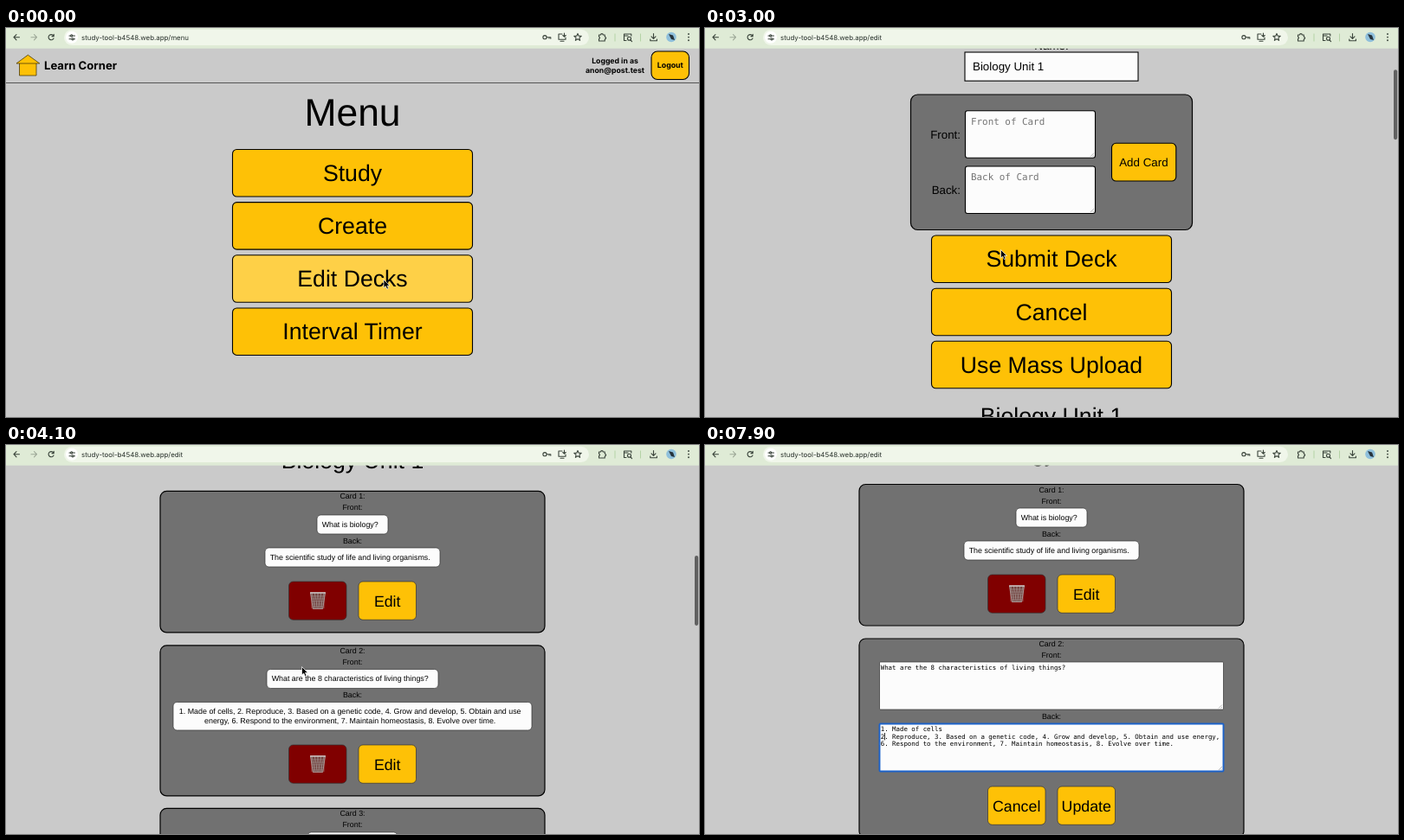
These frames come from a looping animation (800 by 450 pixels, 8 s). An HTML page:

```html
<!DOCTYPE html>
<html lang="en">
<head>
<meta charset="utf-8">
<title>Flashcard editor</title>
<style>
html, body { margin: 0; width: 100%; height: 100%; overflow: hidden; background: #cacaca; }
svg { display: block; width: 100vw; height: 100vh; }
text { font-family: "Liberation Sans", Arial, sans-serif; text-rendering: geometricPrecision; white-space: pre; }
.ui { font-family: Inter, sans-serif; }
.bold { font-weight: 700; }
.mono { font-family: "DejaVu Sans Mono", monospace; }
.hint { fill: #757575; }
.btn { fill: #fec106; stroke: #000; stroke-width: 1.1; }
.hover { fill: #fed047; }
.danger { fill: #800000; }
.panel { fill: #717171; stroke: #000; stroke-width: 1.2; }
.field { fill: #fcfcfc; stroke: #000; stroke-width: 1.1; }
.thin { stroke: #333; stroke-width: .7; }
.focus { stroke: #1c62c9; stroke-width: 1.9; }
.icon { fill: none; stroke: #39433a; stroke-width: 1.1; stroke-linecap: round; stroke-linejoin: round; }
</style>
</head>
<body>
<svg id="stage" viewBox="0 0 800 450"></svg>
<script>
const LOOP = 8000, STEP = 100;
const TIMES = { select: 200, edit: 1700, cardEdit: 5200, backFocus: 6600, typing: 6900 };
const CHAR = 4.455, TEXT_X = 202.7, LINE = 8.7, COLUMNS = 88;

const rect = (x, y, w, h, r, cls, extra = '') =>
  `<rect x="${x}" y="${y}" width="${w}" height="${h}" rx="${r}" class="${cls}" ${extra}/>`;
const text = (str, x, y, size, anchor = 'middle', cls = '', extra = '') =>
  `<text x="${x}" y="${y}" font-size="${size}" text-anchor="${anchor}" class="${cls}" ${extra}>${str}</text>`;
const path = (d, cls = 'icon', extra = '') => `<path d="${d}" class="${cls}" ${extra}/>`;
const group = (id, content, y = 0) => `<g id="${id}" transform="translate(0 ${y})">${content}</g>`;

const bigButton = (label, y, id = '') =>
  rect(261.5, y, 277, 54.5, 5, 'btn', id && `id="${id}"`) + text(label, 400, y + 36.3, 26.67);
const smallButton = (label, x, y, id = '') =>
  rect(x, y, 66.5, 44.3, 5, 'btn thin', id && `id="${id}"`) + text(label, x + 33.2, y + 28.6, 17.78);
const title = label => text(label, 400, 113.3, 44.44);
const grip = (x, y) => path(`M${x - 5} ${y - 1}l4-4M${x - 2.5} ${y - 1}l1.5-1.5`, '', 'stroke="#888" stroke-width=".6"');

function header(x) {
  return path(`M${x + 3.5} 41V55h19.5V41M${x} 41l13.3-9.8L${x + 26.8} 41Z`, '', 'fill="#fec106" stroke="#4b3a08" stroke-width=".8"')
    + text('Learn Corner', x + 32, 48.4, 13.1, 'start', 'ui bold')
    + text('Logged in as', 703, 41.4, 8.7, 'middle', 'ui bold')
    + text('anon@post.test', 703, 51.8, 8.7, 'middle', 'ui bold')
    + rect(745, 27, 43.5, 32.5, 7, 'btn') + text('Logout', 766.8, 46.4, 8.8, 'middle', 'ui bold')
    + path('M0 63.5H800', '', 'stroke="#555" stroke-width="1"');
}

function trash(x, y) {
  let wires = '';
  for (let i = 0; i < 5; i++) {
    wires += `M${x - 7 + i * 3.5} ${y - 9}L${x - 3 + i * 2.5} ${y + 9}M${x + 7 - i * 3.5} ${y - 9}L${x + 3 - i * 2.5} ${y + 9}`;
    wires += `M${x - 7.6 + i * .4} ${y - 5 + i * 3}h${15.2 - i * .8}`;
  }
  return path(`M${x - 8.5} ${y - 9}h17l-2.8 18.5h-11.4Z`, '', 'fill="#71403d" stroke="#b9b2b0" stroke-width=".8"')
    + path(wires, '', 'fill="none" stroke="#aaa19f" stroke-width=".45"')
    + path(`M${x - 9} ${y - 9}h18`, '', 'stroke="#d2cdcb" stroke-width="1.3"');
}

const answerBox = (y, width, lines) =>
  rect(400 - width / 2, y, width, 22 + (lines.length - 1) * 10.5, 4.5, 'field thin')
  + lines.map((line, i) => text(line, 397.2, y + 13.9 + i * 10.4, 8.89)).join('');

const cardLabels = (n, backY) =>
  text(`Card ${n}:`, 400, 9, 8.89) + text('Front:', 400, 22, 8.89) + text('Back:', 400, backY, 8.89);

function card(n, frontWidth, front, backWidth, back, id = '') {
  const y = 104.5 + (back.length - 1) * 10.5;
  return rect(178, 0, 444, y + 59, 7.5, 'panel') + cardLabels(n, 60.5)
    + answerBox(27.5, frontWidth, [front]) + answerBox(65.5, backWidth, back)
    + rect(326.5, y, 66.5, 44.3, 5, 'btn thin danger') + trash(360, y + 22)
    + smallButton('Edit', 407, y, id);
}

const editArea = (id, y) => rect(201.5, y, 397, 55, 1, 'field thin', `id="${id}"`) + grip(598, y + 54.5);
const question = 'What are the 8 characteristics of living things?';

const cardForm = rect(178, 0, 444, 230, 7.5, 'panel') + cardLabels(2, 93.3)
  + editArea('frontArea', 27) + editArea('backArea', 98.5)
  + text(question, TEXT_X, 35.5, 7.4, 'start', 'mono')
  + [0, 1, 2].map(i => text('', TEXT_X, 107 + i * LINE, 7.4, 'start', 'mono', `id="line${i}"`)).join('')
  + '<rect id="caret" width=".8" height="8.4"/>'
  + smallButton('Cancel', 326.5, 171) + smallButton('Update', 407, 171);

const menuPage = header(12) + title('Menu')
  + ['Study', 'Create', 'Edit Decks', 'Interval Timer'].map((s, i) => bigButton(s, 140.5 + i * 61.15, 'menu' + i)).join('');

const selectPage = header(11.3) + title('Select a Deck')
  + ['1: React', '2: Biology Unit 1'].map((s, i) =>
    rect(270.5, 140.5 + i * 46.1, 259, 39.5, 7.5, 'btn', `id="deck${i}"`)
    + text(s, 280, 166.5 + i * 46.2, 17.78, 'start')).join('');

const cardField = (label, placeholder, y) => text(label, 295, y + 32.3, 13.33, 'end')
  + rect(300.5, y, 150, 54.5, 2.5, 'field') + grip(450, y + 54)
  + text(placeholder, 307, y + 16.3, 10.9, 'start', 'mono hint');

const editPage = header(11.3) + title('Edit Deck')
  + text('Name:', 400, 145, 13.33) + rect(300, 148, 200, 33.2, 0, 'field')
  + text('Biology Unit 1', 309, 169.3, 13.33, 'start')
  + rect(237.5, 197, 325, 156.5, 8, 'panel')
  + cardField('Front:', 'Front of Card', 215.7) + cardField('Back:', 'Back of Card', 280)
  + rect(469.5, 253.3, 74.3, 43.7, 5, 'btn') + text('Add Card', 506.4, 279.8, 13.33)
  + bigButton('Submit Deck', 360) + bigButton('Cancel', 421.2) + bigButton('Use Mass Upload', 482.3)
  + text('Biology Unit 1', 400, 578.2, 26.67)
  + group('card1', card(1, 82, 'What is biology?', 202, ['The scientific study of life and living organisms.']), 604.5)
  + group('cardView', card(2, 198, question, 414, [
      '1. Made of cells, 2. Reproduce, 3. Based on a genetic code, 4. Grow and develop, 5. Obtain and use',
      'energy, 6. Respond to the environment, 7. Maintain homeostasis, 8. Evolve over time.'], 'editButton')
    + group('card3', card(3, 104, 'What is homeostasis?', 250, ['Keeping stable conditions inside a living organism.']), 188.5), 783)
  + group('cardForm', cardForm, 783);

const toolbar = rect(0, 0, 800, 23.7, 0, '', 'fill="#dfebd6"') + rect(67, 1.8, 606, 18.2, 9.1, '', 'fill="#f0f6ea"')
  + '<circle cx="76" cy="10.8" r="7" fill="#fff"/>'
  + path('M15.5 10.7H9M12 7.6l-3 3.1 3 3.1')
  + path('M29 10.7h6.5M32.5 7.6l3 3.1-3 3.1', 'icon', 'opacity=".4"')
  + path('M54.8 9A3.1 3.1 0 1 0 55 12M55.2 7.3V9.6H53')
  + path('M73 9h1.5M77 9h2.5M73 12.8h2.5M78.2 12.8h1.3')
  + '<circle cx="75.7" cy="9" r="1.1" class="icon"/><circle cx="77" cy="12.8" r="1.1" class="icon"/>'
  + text('', 87, 13.5, 7.9, 'start', 'ui', 'id="url" fill="#27302a"')
  + '<circle cx="622" cy="10.7" r="2.1" class="icon"/>' + path('M624.2 10.7h4.6v1.6M627 10.8v1.2')
  + path('M642 7h-4v6.3h8V11M640 15.2h4M644.5 6v4M642.8 8.5l1.7 1.7 1.7-1.7')
  + path('M660 6.4l1.2 2.8 3 .2-2.3 2 .7 3-2.6-1.6-2.6 1.6.7-3-2.3-2 3-.2Z')
  + path('M684.5 8h2a1.4 1.4 0 0 1 2.8 0h2v2.3a1.3 1.3 0 0 1 0 2.6V15h-6.8v-2.4a1.3 1.3 0 0 0 0-2.5Z')
  + path('M703 6.5v9M732.5 6.5v9', '', 'stroke="#b5d3a6" stroke-width="1"')
  + path('M716 14.5h-2.5V7h8.3v2M714 9h4M721 14l1.6 1.6') + '<circle cx="719.5" cy="12.3" r="2" class="icon"/>'
  + path('M747.5 6.5v5.5M745 9.8l2.5 2.5 2.5-2.5M743.8 13v1.8h7.6V13')
  + '<circle cx="768" cy="10.5" r="5.8" fill="#8fc0dc"/>' + path('M765 7l5 1.5 2 5.5-4-1Z', '', 'fill="#26333c"')
  + [7, 10.6, 14.2].map(y => `<circle cx="788" cy="${y}" r=".95" fill="#39433a"/>`).join('');

document.getElementById('stage').innerHTML = rect(0, 0, 800, 450, 0, '', 'fill="#cacaca"')
  + group('menu', menuPage) + group('select', selectPage) + group('edit', editPage)
  + rect(795, 0, 4.2, 81, 2.1, '', 'id="thumb" fill="#606060"') + toolbar
  + path('M0 0V9.6l2.2-2 1.6 3.5 1.7-.8L4 7h3Z', '', 'id="cursor" stroke="#fff" stroke-width=".7"');

const $ = id => document.getElementById(id);
const show = (id, on) => $(id).style.display = on ? '' : 'none';

const scrollTrack = [[2400, 0], [3000, 120], [3600, 386], [4200, 559]];
const cursorX = [[500, 436], [1100, 331.5], [2000, 331.5], [2400, 341.5], [4200, 341.5], [4700, 434.5], [5400, 434.5], [6200, 289.5]];
const cursorY = [[500, 291], [1100, 196.5], [2000, 196.5], [2400, 256.5], [4200, 256.5], [4700, 351], [5400, 351], [6200, 330.5]];

// Monotone cubic interpolation that rests at both ends and on plateaus.
function track(points, t) {
  const n = points.length;
  if (t <= points[0][0]) return points[0][1];
  if (t >= points[n - 1][0]) return points[n - 1][1];
  const slope = i => i < 0 || i > n - 2 ? 0 : (points[i + 1][1] - points[i][1]) / (points[i + 1][0] - points[i][0]);
  const tangent = i => {
    const a = slope(i - 1), b = slope(i);
    return a * b > 0 ? 2 * a * b / (a + b) : 0;
  };
  const i = points.findIndex(p => p[0] > t) - 1;
  const [t0, v0] = points[i], [t1, v1] = points[i + 1];
  const h = t1 - t0, u = (t - t0) / h, w = 1 - u;
  return v0 * w * w * (1 + 2 * u) + v1 * u * u * (3 - 2 * u) + h * u * w * (tangent(i) * w - tangent(i + 1) * u);
}

const beforeEdit = '1. Made of cells';
const afterEdit = '2. Reproduce, 3. Based on a genetic code, 4. Grow and develop, 5. Obtain and use energy, '
  + '6. Respond to the environment, 7. Maintain homeostasis, 8. Evolve over time.';
// time, separator, caret line, caret column
const keystrokes = [
  [TIMES.backFocus, ', ', 0, 19], [TIMES.typing, ', ', 0, 18], [7300, ',', 0, 17],
  [7400, '', 0, 16], [7600, '\n', 1, 0], [7800, '\n', 1, 1]];

function wrap(str) {
  return str.split('\n').flatMap(paragraph => {
    const lines = [''];
    for (const word of paragraph.split(' ')) {
      const last = lines[lines.length - 1], joined = last ? last + ' ' + word : word;
      if (joined.length <= COLUMNS) lines[lines.length - 1] = joined;
      else lines.push(word);
    }
    return lines;
  });
}

function drawForm(t) {
  const onBack = t >= TIMES.backFocus;
  $('frontArea').classList.toggle('focus', !onBack);
  $('backArea').classList.toggle('focus', onBack);
  const [since, separator, line, column] =
    keystrokes.filter(k => k[0] <= t).pop() || [TIMES.cardEdit, ', ', 0, 0];
  const lines = wrap(beforeEdit + separator + afterEdit);
  for (let i = 0; i < 3; i++) $('line' + i).textContent = lines[i] || '';
  $('caret').setAttribute('x', TEXT_X + column * CHAR);
  $('caret').setAttribute('y', (onBack ? 100.3 : 28.8) + line * LINE);
  show('caret', (t - since) % 1000 < 500);
}

function draw(t) {
  const page = t < TIMES.select ? 'menu' : t < TIMES.edit ? 'select' : 'edit';
  for (const id of ['menu', 'select', 'edit']) show(id, id === page);
  $('url').textContent = 'study-tool-b4548.web.app/' + (page === 'select' ? 'select-deck' : page);

  const x = track(cursorX, t), y = track(cursorY, t), scroll = track(scrollTrack, t);
  $('cursor').setAttribute('transform', `translate(${x} ${y})`);
  show('cursor', t < TIMES.typing);
  $('menu2').classList.toggle('hover', true);
  $('deck1').classList.toggle('hover', y < 226);
  $('editButton').classList.toggle('hover', x > 407 && y > 339);

  $('edit').setAttribute('transform', `translate(0 ${-scroll})`);
  $('thumb').setAttribute('y', 26 + scroll * .185);
  $('thumb').style.opacity = t < 2400 ? 0 : Math.max(0, Math.min(1, (5300 - t) / 300));

  const editing = t >= TIMES.cardEdit;
  show('cardView', !editing);
  show('cardForm', editing);
  if (editing) drawForm(t);
}

const start = performance.now();
function frame() {
  const t = (performance.now() - start) % LOOP;
  draw(Math.floor(t / STEP) * STEP);
  requestAnimationFrame(frame);
}
frame();
</script>
</body>
</html>
```
